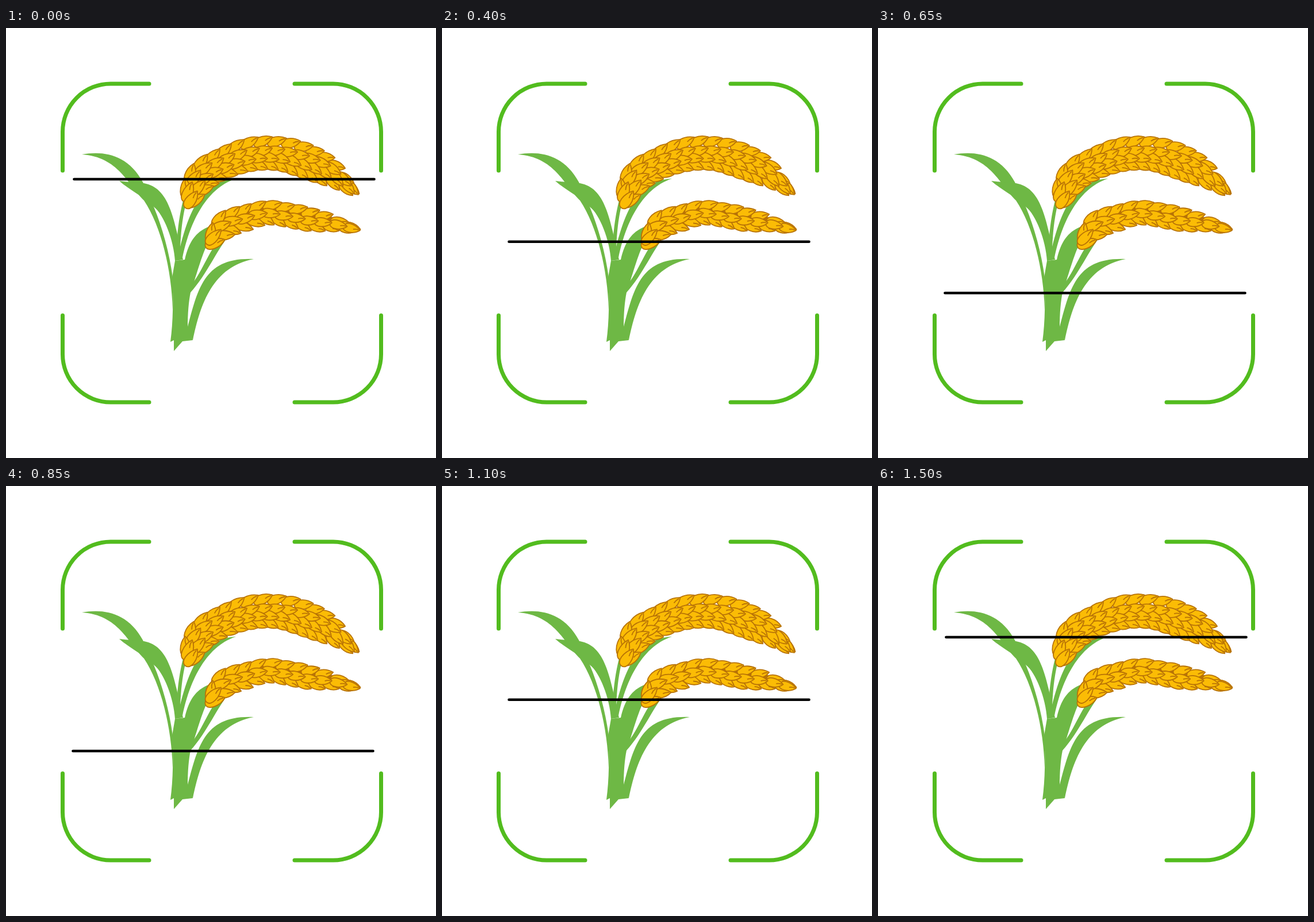
These frames come from a looping animation (748x748 px, 1.55 s). An HTML page with a canvas:

```html
<!DOCTYPE html>
<html lang="en">
<head>
<meta charset="utf-8">
<title>Crop scan</title>
<style>
  html, body { margin: 0; width: 100%; height: 100%; overflow: hidden; background: #fff; }
  canvas { display: block; width: 748px; height: 748px; }
</style>
</head>
<body>
<canvas id="stage" width="748" height="748"></canvas>
<script>
const SIZE = 748, STEP = 50, STEPS = 31;
const GREEN = '#6eb845', FRAME = '#52bc1e', GOLD = '#fbbc05', BROWN = '#b87306';

// Catmull-Rom curve through evenly spaced knots, u in 0..1
function spline(knots, u) {
  const pos = u * (knots.length - 1);
  const i = Math.min(Math.floor(pos), knots.length - 2);
  const t = pos - i;
  const at = k => knots[Math.max(0, Math.min(knots.length - 1, k))];
  const [a, b, c, d] = [at(i - 1), at(i), at(i + 1), at(i + 2)];
  return b + t * (c - a + t * (2 * a - 5 * b + 4 * c - d + t * (3 * (b - c) + d - a))) / 2;
}

const brackets = [
  'M249 97H182A83.5 83.5 0 0 0 98.5 180.5V248',
  'M502 97H569A83.5 83.5 0 0 1 652.5 180.5V248',
  'M98.5 500V567.5A83.5 83.5 0 0 0 182 651H249',
  'M652.5 500V567.5A83.5 83.5 0 0 1 569 651H502'
];

const leaves = [
  'M132 220C170 213 212 220 238 268L257 311C272 347 284 390 290 434L290 490C288 420 270 345 240 300C212 272 195 224 132 220Z',
  'M197 266C212 268 225 268 240 270C284 278 292 330 308 403L294 405C292 370 275 325 257 311C235 290 215 282 197 266Z',
  'M294 405L311 403C318 372 330 355 352 346L353 370C340 395 330 435 321 460C318 475 316 495 316 522L325 543L307 545L292 562L292 543L286 546C291 510 291 470 289 434Z',
  'M308 300L314 300C306 335 305 350 303 382L297 375C299 345 302 325 308 300Z',
  'M400 262C340 265 318 320 302 385L307 400C318 345 345 280 400 262Z',
  'M380 358C352 385 345 420 320 450L321 460C350 428 366 387 390 358Z',
  'M431 402C345 398 334 452 315 524L325 543C338 480 360 415 431 402Z'
];

// Axis knots and half width of each ear, base to tip
const ears = [
  { x: [316, 341, 384, 431, 481, 529, 571, 612], y: [304, 258, 234, 220, 220, 234, 255, 291],
    w: [14, 26, 26, 28, 29, 31, 25, 4], rows: [-1, 1, -0.36, 0.34], count: 16, length: 36, girth: 9.5 },
  { x: [358, 383, 417, 455, 494, 532, 573, 616], y: [371, 342, 331, 322, 327, 334, 340, 352],
    w: [11, 22, 22, 20, 20, 20, 14, 2], rows: [-1, 1, 0], count: 12, length: 35, girth: 9 }
];

// The tip lies at (x, y); the body reaches back from it
function drawGrain(g, x, y, angle, length, girth) {
  g.save();
  g.translate(x, y);
  g.rotate(angle);
  g.beginPath();
  g.moveTo(-length, 0);
  g.bezierCurveTo(-length, -girth * 1.3, -length * 0.38, -girth * 1.25, 0, 0);
  g.bezierCurveTo(-length * 0.32, girth * 1.25, -length, girth * 1.3, -length, 0);
  g.fill();
  g.stroke();
  g.beginPath();
  g.moveTo(-length * 0.08, 0);
  g.quadraticCurveTo(-length * 0.25, -1, -length * 0.4, 1);
  g.stroke();
  g.restore();
}

function drawEar(g, ear) {
  const point = u => [spline(ear.x, u), spline(ear.y, u)];
  g.strokeStyle = BROWN;
  g.lineWidth = 20;
  g.beginPath();
  for (let u = 0.12; u < 0.88; u += 0.02) g.lineTo(...point(u));
  g.stroke();

  g.fillStyle = GOLD;
  g.lineWidth = 1.8;
  for (let k = ear.count - 1; k >= 0; k--) {
    ear.rows.forEach((side, row) => {
      const wobble = Math.sin(k * 12.9 + row * 7.3);
      const u = 0.1 + 0.9 * (k - (row % 2) * 0.4) / (ear.count - 1);
      const [x, y] = point(u);
      const [px, py] = point(u - 0.03);
      const heading = Math.atan2(y - py, x - px);
      const offset = spline(ear.w, u) * side * (0.97 + wobble * 0.06);
      drawGrain(g, x - Math.sin(heading) * offset, y + Math.cos(heading) * offset,
        heading + side * 0.5 * (1 - u ** 6) + wobble * 0.1,
        ear.length * (1 - 0.1 * u) + wobble * 1.5, ear.girth * (1 - 0.12 * u));
    });
  }
}

function drawScene(g) {
  g.fillStyle = '#fff';
  g.fillRect(0, 0, SIZE, SIZE);
  g.lineCap = g.lineJoin = 'round';
  g.lineWidth = 7;
  g.strokeStyle = FRAME;
  brackets.forEach(d => g.stroke(new Path2D(d)));
  g.fillStyle = GREEN;
  leaves.forEach(d => g.fill(new Path2D(d)));
  g.lineCap = 'butt';
  ears.forEach(ear => drawEar(g, ear));
}

// Scan line heights from the lowest point up to the highest
const scanPath = [481.5, 446.5, 390.5, 335, 287, 263];

function drawScanLine(g, step) {
  const distance = Math.abs(15 - step);
  const y = spline(scanPath, distance / 15);
  const left = distance > 8 ? 118.5 : 116.5;
  g.strokeStyle = '#000';
  g.lineWidth = 4.6;
  g.lineCap = 'round';
  g.beginPath();
  g.moveTo(left, y);
  g.lineTo(left + 522, y);
  g.stroke();
}

const scene = document.createElement('canvas');
scene.width = scene.height = SIZE;
drawScene(scene.getContext('2d'));

const ctx = document.getElementById('stage').getContext('2d');
let start;
function render(now) {
  start ??= now;
  ctx.drawImage(scene, 0, 0);
  drawScanLine(ctx, Math.floor((now - start) / STEP) % STEPS);
  requestAnimationFrame(render);
}
requestAnimationFrame(render);
</script>
</body>
</html>
```
